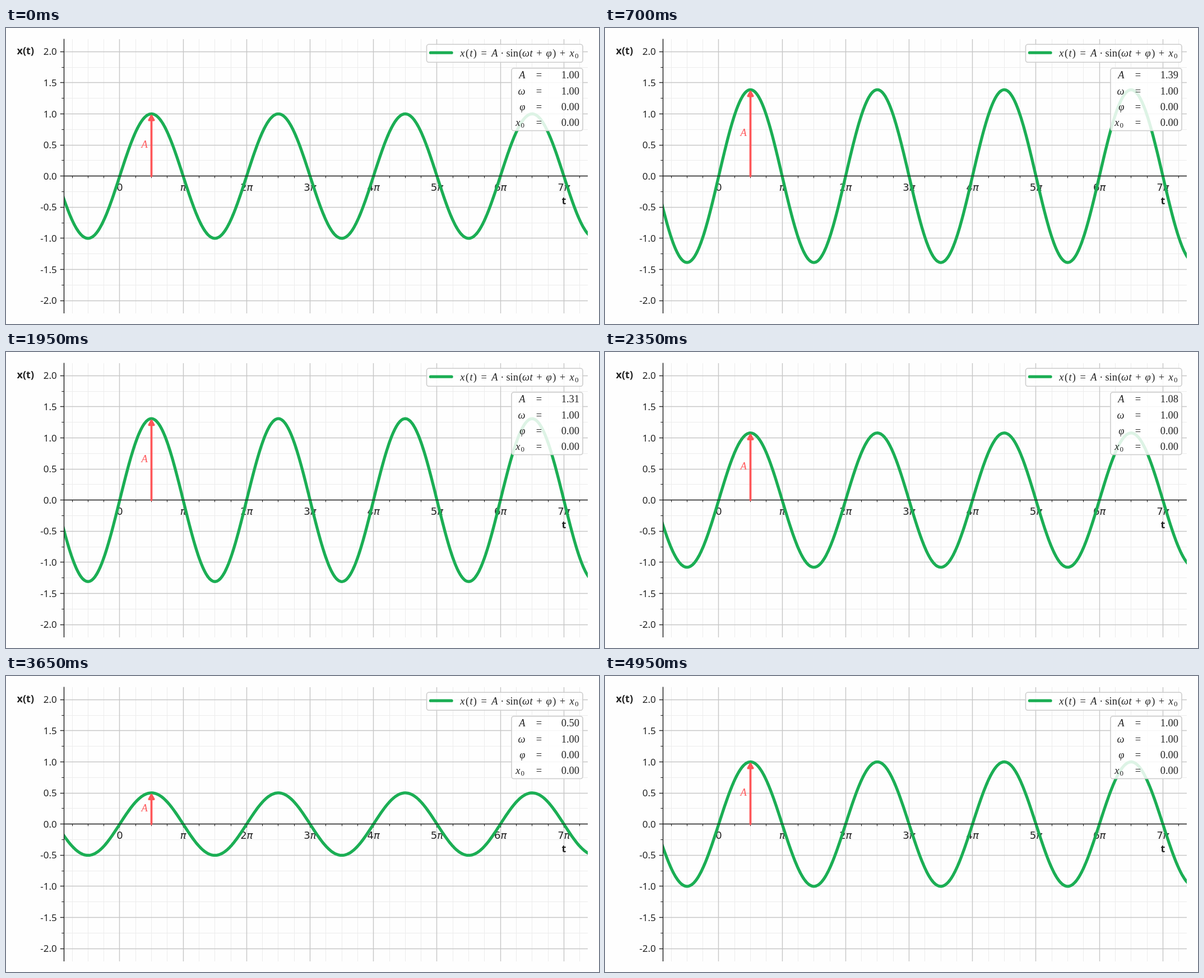
Animation, 1058 px wide and 529 px high, one loop 5 s. Source, as an HTML page:

```html
<!DOCTYPE html>
<html lang="en">
<head>
<meta charset="utf-8">
<title>Amplitude of a sine wave</title>
<style>
  html, body { margin: 0; width: 100%; height: 100%; overflow: hidden; background: #fefefe; }
  svg { display: block; width: 1058px; height: 529px; }
  text { fill: #222; }
  .sans { font: 17px "Noto Sans", "Open Sans", sans-serif; }
  .bold { font: bold 18px "Noto Sans", "Open Sans", sans-serif; }
  .tick { font: 18px "DejaVu Sans", sans-serif; }
  .math { font: 18.4px "Liberation Serif", "Noto Serif", serif; }
  .it { font-style: italic; }
  .sub { font-size: 13px; }
</style>
</head>
<body>
<svg id="stage" viewBox="0 0 1058 529"></svg>
<script>
const NS = "http://www.w3.org/2000/svg";
const stage = document.getElementById("stage");
const LEFT = 103, RIGHT = 1038, TOP = 20, BOTTOM = 510;
const X0 = 202.9, PI_W = 113.2, Y0 = 264.7, UNIT = 111.2;
const GREEN = "#1bae54", RED = "#ff5558", DARK = "#262626";
const LOOP = 5000, STEP = 50, COUNT = LOOP / STEP;

const snap = v => Math.floor(v) + 0.5;
const xAt = turns => X0 + turns * PI_W;
const yAt = v => Y0 - v * UNIT;

function add(tag, attrs, parent = stage) {
  const el = document.createElementNS(NS, tag);
  for (const k in attrs) el.setAttribute(k, attrs[k]);
  return parent.appendChild(el);
}
function line(x1, y1, x2, y2, color, width) {
  return add("line", { x1, y1, x2, y2, stroke: color, "stroke-width": width });
}
function label(str, x, y, cls, anchor = "middle") {
  const el = add("text", { x, y, class: cls, "text-anchor": anchor });
  el.textContent = str;
  return el;
}
function box(x, y, w, h) {
  add("rect", { x, y, width: w, height: h, rx: 4, fill: "#fff", "fill-opacity": 0.85,
    stroke: "#ccc", "stroke-width": 1.6 });
}

// Grid: minor lines first, then major lines above them
function grid(major) {
  const color = major ? "#c6c6c6" : "#ececec", width = major ? 1.4 : 1;
  for (let q = -3; q <= 29; q++) {
    const x = snap(xAt(q / 4));
    if ((q % 4 === 0) === major) line(x, TOP, x, BOTTOM, color, width);
  }
  for (let q = -8; q <= 8; q++) {
    const y = snap(yAt(q / 4));
    if ((q % 2 === 0) === major) line(LEFT, y, RIGHT, y, color, width);
  }
}
grid(false);
grid(true);

// Ticks and their labels
for (let q = -3; q <= 29; q++) {
  const x = snap(xAt(q / 4)), major = q % 4 === 0;
  line(x, 264.5, x, 264.5 + (major ? 6.3 : 3.7), DARK, major ? 1.4 : 1.1);
  if (!major) continue;
  const n = q / 4;
  const el = label(n === 0 ? "0" : n > 1 ? n : "", xAt(n), 291.3, "tick");
  if (n > 0) add("tspan", { class: "it" }, el).textContent = "π";
}
for (let q = -8; q <= 8; q++) {
  const y = snap(yAt(q / 4)), major = q % 2 === 0;
  line(LEFT - (major ? 6.3 : 3.7), y, LEFT, y, DARK, major ? 1.4 : 1.1);
  if (major) label((q / 4).toFixed(1), 90.8, yAt(q / 4) + 6.1, "sans", "end");
}
label("x(t)", 34.8, 47, "bold");
label("t", 995.3, 315, "bold");

// Curve, axes and amplitude arrow
const clip = add("clipPath", { id: "plot" });
add("rect", { x: LEFT, y: TOP, width: RIGHT - LEFT, height: BOTTOM - TOP }, clip);
const curve = add("path", { fill: "none", stroke: GREEN, "stroke-width": 5.3,
  "stroke-linejoin": "round", "clip-path": "url(#plot)" });
line(snap(LEFT), TOP - 0.5, snap(LEFT), BOTTOM, DARK, 1.5);
line(LEFT, 264.5, RIGHT, 264.5, DARK, 1.5);

const peakX = xAt(0.5);
const shaft = line(peakX, Y0, peakX, Y0, RED, 3.7);
shaft.setAttribute("stroke-linecap", "round");
const head = add("path", { d: "M0 3.5L4.2 11.2H-4.2Z", fill: RED, stroke: RED,
  "stroke-width": 3.7, "stroke-linejoin": "round" });
const ampName = label("A", 247, 0, "math it");
ampName.style.fill = RED;

// Legend: each token takes its advance in em
box(750.5, 29.3, 278.5, 32);
add("line", { x1: 757.5, y1: 44.2, x2: 795, y2: 44.2, stroke: GREEN,
  "stroke-width": 5.3, "stroke-linecap": "round" });
const FORMULA = [
  ["x", 0.572, "it"], ["(", 0.389], ["t", 0.361, "it"], [")", 0.389], ["=", 1.334],
  ["A", 0.75, "it"], ["·", 0.722], ["sin", 1.228], ["(", 0.389], ["ω", 0.658, "it"],
  ["t", 0.361, "it"], ["+", 1.222], ["φ", 0.654, "it"], [")", 0.389], ["+", 1.222],
  ["x", 0.572, "it"], ["0", 0.37, "sub"]
];
let pen = 809;
for (const [str, em, cls = ""] of FORMULA) {
  const w = em * 18.35;
  label(str, pen + w / 2, cls === "sub" ? 53.6 : 50.8, "math " + cls);
  pen += w;
}

// Parameter table
box(902, 72, 127, 111.5);
const values = ["A", "ω", "φ", "x"].map((name, i) => {
  const y = 90.2 + i * 28.4, hasSub = name === "x";
  label(name, hasSub ? 917.5 : 926.5, y, "math it", "end");
  if (hasSub) label("0", 921.8, y + 2.8, "math sub");
  label("=", 951, y, "math");
  return label(i === 1 ? "1.00" : "0.00", 1023, y, "math", "end");
});

function draw(ms) {
  const k = Math.floor((ms % LOOP) / STEP);
  const amp = 1 + 0.5 * Math.sin(2 * Math.PI * k / (COUNT - 1));
  let d = "";
  for (let x = LEFT - 4; x <= RIGHT + 4; x += 2) {
    const y = yAt(amp * Math.sin((x - X0) / PI_W * Math.PI));
    d += (d ? "L" : "M") + x + " " + y.toFixed(2);
  }
  curve.setAttribute("d", d);
  const tip = yAt(amp);
  shaft.setAttribute("y2", tip + 7);
  head.setAttribute("transform", `translate(${peakX} ${tip})`);
  ampName.setAttribute("y", yAt(amp / 2) + 5);
  values[0].textContent = amp.toFixed(2);
}

const start = performance.now();
function tick() {
  draw(performance.now() - start);
  requestAnimationFrame(tick);
}
tick();
</script>
</body>
</html>
```
